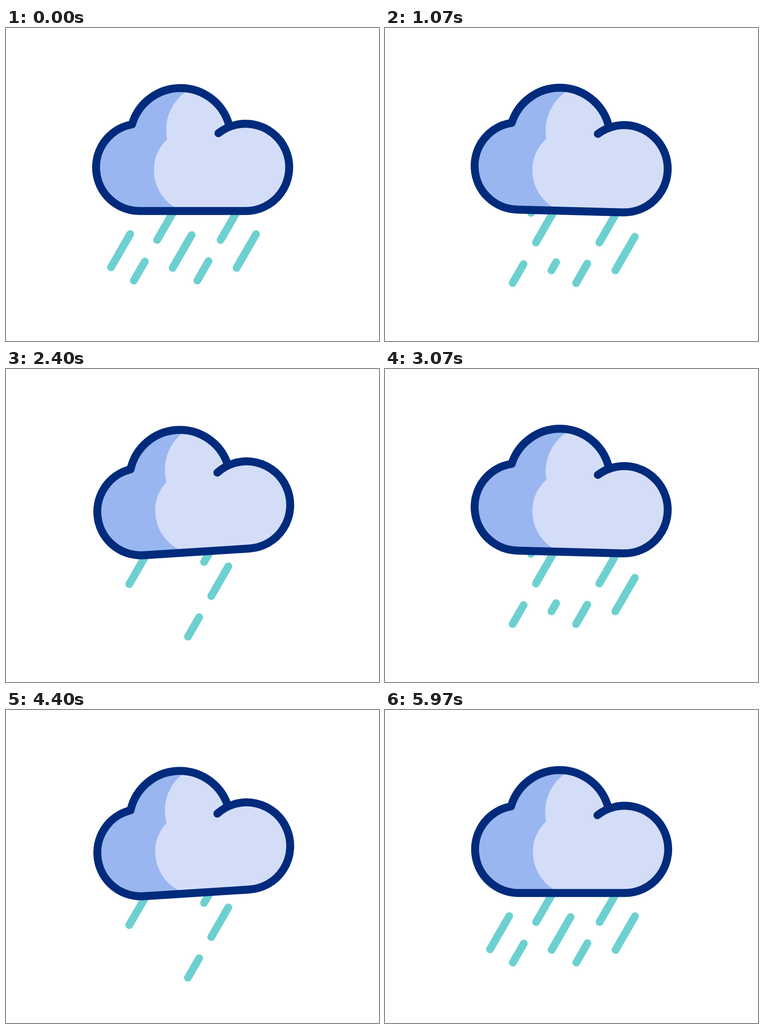
Write an HTML page that moves like this. It is 817x685 px and loops after 6.01 s.

```html
<!DOCTYPE html>
<html lang="en">
<head>
<meta charset="utf-8">
<title>Rain cloud</title>
<style>
  html, body { margin: 0; width: 100%; height: 100%; overflow: hidden; background: #fff; }
  svg { display: block; width: 100vw; height: 100vh; }
  #rain { stroke: #6dd0d0; stroke-width: 17; stroke-linecap: round; }
  #outline { fill: none; stroke: #002b7c; stroke-width: 17.4; stroke-linecap: round; stroke-linejoin: round; }
</style>
</head>
<body>
<svg viewBox="0 0 817 685">
  <defs>
    <path id="shape" d="M465.3 230.3A95.5 95.5 0 1 1 523.5 400.5H294A95.5 95.5 0 0 1 276 211A110.6 110.6 0 0 1 488 210"/>
    <clipPath id="inside"><use href="#shape"/></clipPath>
  </defs>
  <g id="rain"></g>
  <g id="cloud">
    <use href="#shape" fill="#d4ddf8"/>
    <path clip-path="url(#inside)" fill="#99b6f0"
      d="M180 110H420L392 141A102 102 0 0 0 353 244A88 88 0 0 0 324 310A95 95 0 0 0 369 392L380 410H180Z"/>
    <use id="outline" href="#shape"/>
  </g>
</svg>
<script>
const LOOP = 6010, FPS = 25, CYCLE = 22, REST_FROM = 44, PERIOD = 50;

// x, y: lower end at rest; gone: when the tail closes up;
// enter: when the next drop leaves the cloud, from which height and slant
const drops = [
  { x: 230, y: 523.7, len: 84, gone: [0, 3.2],  enter: 3.2,  rise: 130, slant: 0.755 },
  { x: 365, y: 525,   len: 83, gone: [1, 5],    enter: 8.5,  rise: 130, slant: 0.67 },
  { x: 505, y: 525,   len: 85, gone: [4, 7.5],  enter: 10.5, rise: 131, slant: 0.4 },
  { x: 280, y: 552.7, len: 48, gone: [4, 7.6],  enter: 10,   rise: 160, slant: 0.6 },
  { x: 331, y: 464,   len: 75, gone: [4, 7.6],  enter: 12,   rise: 75,  slant: 0.6 },
  { x: 419, y: 552.7, len: 49, gone: [14, 18],  enter: 14,   rise: 160, slant: 0.6 },
  { x: 470, y: 464,   len: 75, gone: [14, 18],  enter: 15,   rise: 75,  slant: 0.6 }
];
const fall = [[0, 0, 0], [4, -0.5, 5.5], [8, -10.5, 20], [10, -20.5, 33], [14, -30, 46]];
const sway = [[0, 0], [11, -3.7], [23, 2], [32, 0], [50, 0]];

const rain = document.getElementById('rain');
const cloud = document.getElementById('cloud');
const clamp = v => Math.min(1, Math.max(0, v));
const linear = p => p;
const smooth = p => (1 - Math.cos(Math.PI * p)) / 2;

function sample(keys, t, col, ease) {
  let i = 0;
  while (i < keys.length - 2 && t > keys[i + 1][0]) i++;
  const a = keys[i], b = keys[i + 1];
  return a[col] + (b[col] - a[col]) * ease(clamp((t - a[0]) / (b[0] - a[0])));
}

function addLine() {
  const line = document.createElementNS('http://www.w3.org/2000/svg', 'line');
  rain.append(line);
  return line;
}

function place(line, shown, x, y, len) {
  line.setAttribute('visibility', shown ? 'visible' : 'hidden');
  line.setAttribute('x1', x);
  line.setAttribute('y1', y);
  line.setAttribute('x2', x + len * 0.5);
  line.setAttribute('y2', y - len * 0.866);
}

for (const d of drops) {
  d.old = addLine();
  d.fresh = addLine();
}

function draw(step) {
  const phase = step % PERIOD;
  const t = phase < REST_FROM ? phase % CYCLE : 0;
  const dx = sample(fall, t, 1, linear);
  const dy = sample(fall, t, 2, linear);

  for (const d of drops) {
    const left = 1 - clamp((t - d.gone[0]) / (d.gone[1] - d.gone[0]));
    place(d.old, left > 0, d.x + dx, d.y + dy, d.len * left);

    const p = clamp((t - d.enter) / (CYCLE - d.enter));
    const up = d.rise * (1 - p) ** 2;
    place(d.fresh, p > 0, d.x + up * d.slant, d.y - up, d.len);
  }
  cloud.setAttribute('transform', `rotate(${sample(sway, phase, 1, smooth)} 409 266)`);
}

// 25 steps a second, shown on a 30 Hz grid
function stepAt(ms) {
  const tick = Math.floor((ms + 4) * 0.03);
  return Math.min(LOOP / 1000 * FPS - 1 | 0, Math.floor(tick * FPS / 30));
}

const start = performance.now();
function frame() {
  draw(stepAt((performance.now() - start) % LOOP));
  requestAnimationFrame(frame);
}
frame();
</script>
</body>
</html>
```
